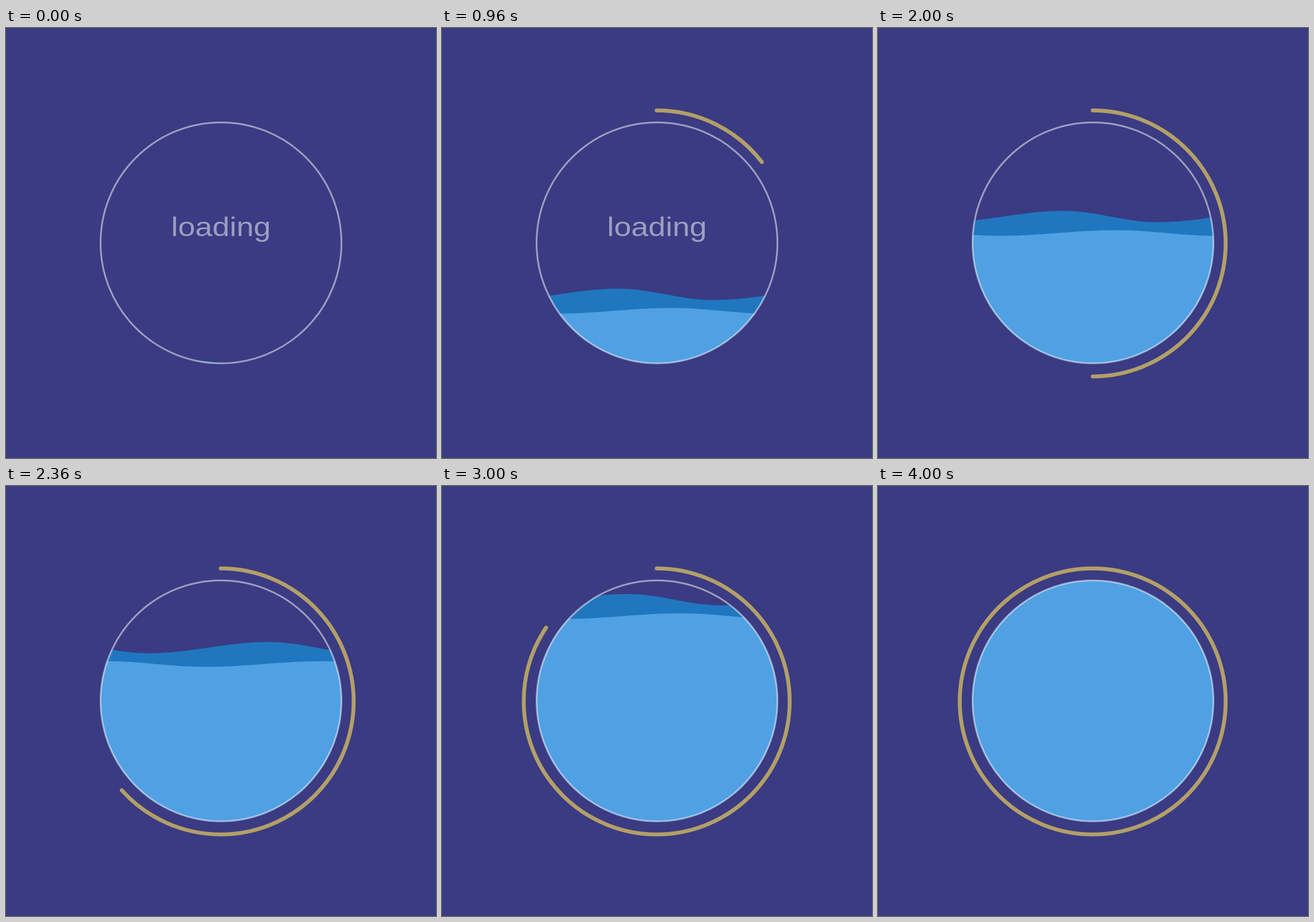
An HTML page for the animation above (4.2 s loop, 748 by 748 pixels).

```html
<!DOCTYPE html>
<html lang="en">
<head>
<meta charset="utf-8">
<title>Loading</title>
<style>
  html, body { margin: 0; width: 100%; height: 100%; overflow: hidden; background: #3a3b82; }
  svg { display: block; width: 100vw; height: 100vh; }
  text { font: 46.8px "Liberation Sans", Arial, sans-serif; text-anchor: middle; }
</style>
</head>
<body>
<svg viewBox="0 0 748 748">
  <clipPath id="bowl"><circle cx="374" cy="373.75" r="209.5"/></clipPath>
  <text transform="translate(374 361.5) scale(1.15 1)" fill="#fff" fill-opacity=".5">loading</text>
  <g clip-path="url(#bowl)">
    <path id="back" fill="#2077c0"/>
    <path id="front" fill="#50a1e3"/>
  </g>
  <circle cx="374" cy="373.75" r="209.5" fill="none" stroke="#fff" stroke-opacity=".5" stroke-width="3"/>
  <circle id="progress" cx="373.5" cy="374.75" r="231.3" pathLength="360" fill="none"
    stroke="#b39f68" stroke-width="6.8" stroke-linecap="round" transform="rotate(-90 373.5 374.75)"/>
</svg>
<script>
const FILL = 4000, LOOP = 4200, STEP = 40;
const PERIOD = 374, SPEED = 0.374, RISE = 0.1302;

// crest: x at time 0; fall: distance from crest to trough
const waves = [
  { id: 'back', level: 588.4, amp: 9.8, crest: 322.5, fall: 164 },
  { id: 'front', level: 617, amp: 4.9, crest: 41, fall: 171 }
];
const byId = id => document.getElementById(id);
const progress = byId('progress');

function surface({ level, amp, crest, fall }, x, t) {
  const d = (((x - crest - SPEED * t) % PERIOD) + PERIOD) % PERIOD;
  const phase = d < fall ? d / fall : 1 + (d - fall) / (PERIOD - fall);
  return level - RISE * t - amp * Math.cos(Math.PI * phase);
}

function wavePath(wave, t) {
  let d = 'M160 600';
  for (let x = 160; x <= 588; x += 4) d += `L${x} ${surface(wave, x, t).toFixed(2)}`;
  return d + 'V600Z';
}

function draw(now) {
  const t = Math.min(FILL, Math.floor((now % LOOP) / STEP) * STEP);
  for (const wave of waves) byId(wave.id).setAttribute('d', wavePath(wave, t));

  const p = t / FILL;
  const angle = 360 * p * p * (3 - 2 * p);
  progress.setAttribute('stroke-dasharray', `${angle} 720`);
  progress.style.visibility = t ? 'visible' : 'hidden';
}

function tick(now) {
  draw(now);
  requestAnimationFrame(tick);
}
draw(0);
requestAnimationFrame(tick);
</script>
</body>
</html>
```
